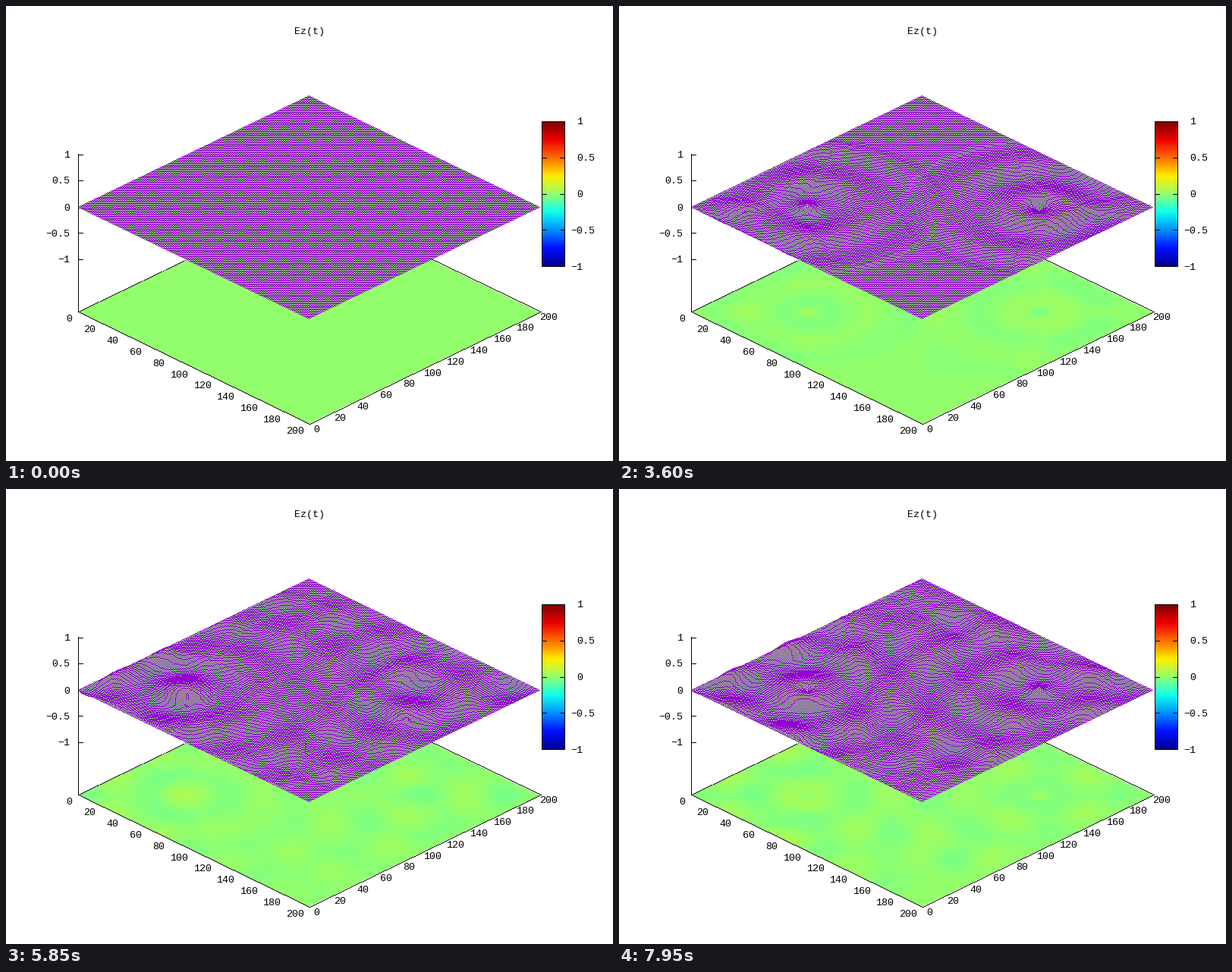
Recreate the animation shown at these times as a matplotlib script. Size 800 by 600 pixels, loop 8 s.

```python
import numpy as np
import matplotlib.pyplot as plt
from matplotlib.animation import FuncAnimation
from matplotlib.colors import LinearSegmentedColormap

W, H, DPI = 800, 600, 100
N = 200                       # grid points per side
SNAPSHOTS, STEPS = 54, 5      # pictures, and solver steps between them
TICK_MS, TICKS_PER_SNAPSHOT, LOOP_MS = 50, 3, 8000
OMEGA = 2 * np.pi / 60        # source frequency per solver step

X0, DX, DY = 95.2, 1.5265, 0.737     # isometric projection
SURFACE_Y, BASE_Y, Z_SCALE = 264.8, 403.4, 69
PURPLE, BLACK = (148, 0, 211, 255), (0, 0, 0, 255)
TICK_VALUES = (1, 0.5, 0, -0.5, -1)

JET = LinearSegmentedColormap.from_list(
    "jet_steps",
    ["#000090", "#000fff", "#0090ff", "#0fffee", "#90ff70",
     "#ffee00", "#ff7000", "#ee0000", "#7f0000"], N=128)


def simulate():
    """2D FDTD of Ez with two opposed sine sources; the border itself stays at zero."""
    ez = np.zeros((N, N))
    hx, hy = np.zeros((N, N - 1)), np.zeros((N - 1, N))
    courant = 1 / np.sqrt(2)
    fields = [ez.copy()]
    for n in range(1, (SNAPSHOTS - 1) * STEPS + 1):
        # H next to the low sides is never updated, so those walls reflect in phase
        hx[:, 1:] -= courant * np.diff(ez[:, 1:], axis=1)
        hy[1:] += courant * np.diff(ez[1:], axis=0)
        curl = np.diff(hy, axis=0)[:, 1:-1] - np.diff(hx, axis=1)[1:-1]
        ez[1:-1, 1:-1] += courant * curl
        ez[50, 50] += np.sin(OMEGA * n)
        ez[150, 150] -= np.sin(OMEGA * n)
        if n % STEPS == 0:
            fields.append(ez.copy())
    return fields


def to_pixel(v):
    return np.floor(np.asarray(v) + 0.5).astype(int)


def draw_lines(picture, x0, y0, x1, y1, color):
    """Draw one-pixel lines between arrays of integer end points."""
    x, y, x1, y1 = (np.ravel(v) for v in (x0, y0, x1, y1))
    dx, dy = x1 - x, y1 - y
    length = np.maximum(np.maximum(abs(dx), abs(dy)), 1)
    for t in range(length.max() + 1):
        live = length >= t
        part = t / length[live]
        step_x, step_y = (np.sign(d[live]) * to_pixel(abs(d[live]) * part)
                          for d in (dx, dy))
        picture[y[live] + step_y, x[live] + step_x] = color


def draw_path(picture, *points):
    xs, ys = np.array(points).T
    draw_lines(picture, xs[:-1], ys[:-1], xs[1:], ys[1:], BLACK)


grid_x, grid_y = np.meshgrid(np.arange(N), np.arange(N), indexing="ij")
node_x = X0 + DX * (grid_x + grid_y)
node_y = SURFACE_Y + DY * (grid_x - grid_y)
node_px = to_pixel(node_x)

# Pixels of the base map and the cell each one shows
rows, cols = np.mgrid[0:H, 0:W]
along, across = (cols - X0) / DX, (rows - BASE_Y) / DY
cell_x, cell_y = (along + across) / 2, (along - across) / 2
on_map = (cell_x >= 0) & (cell_x < N - 1) & (cell_y >= 0) & (cell_y < N - 1)
map_i, map_j = cell_x[on_map].astype(int), cell_y[on_map].astype(int)


def inside_cells(values, u, v):
    """Bilinear value at offset (u, v) of every cell."""
    low = values[:-1, :-1] * (1 - v) + values[:-1, 1:] * v
    high = values[1:, :-1] * (1 - v) + values[1:, 1:] * v
    return low * (1 - u) + high * u


def draw_surface(picture, field, colors):
    screen_y = node_y - Z_SCALE * field
    back_to_front = np.s_[:, ::-1]
    for u in np.arange(4) / 4:
        for v in np.arange(4) / 4:
            px = to_pixel(inside_cells(node_x, u, v))[back_to_front]
            py = to_pixel(inside_cells(screen_y, u, v))[back_to_front]
            picture[py, px] = colors[back_to_front]
    py = to_pixel(screen_y)
    draw_lines(picture, node_px[:-1], py[:-1], node_px[1:], py[1:], PURPLE)
    draw_lines(picture, node_px[:, :-1], py[:, :-1], node_px[:, 1:], py[:, 1:], PURPLE)


def draw_background():
    picture = np.full((H, W, 4), 255, np.uint8)
    draw_path(picture, (95, 403), (400, 256), (705, 403))
    picture[152:344, 706:737] = JET(np.linspace(1, 0, 192), bytes=True)[:, None]
    draw_path(picture, (706, 152), (736, 152), (736, 343), (706, 343), (706, 152))
    for value in TICK_VALUES:
        y = bar_row(value)
        draw_path(picture, (706, y), (712, y))
        draw_path(picture, (730, y), (736, y))
    return picture


def draw_front_axes(picture):
    draw_path(picture, (95, 403), (400, 551), (705, 403))
    draw_path(picture, (95, 195), (95, 403))
    for value in TICK_VALUES:
        y = axis_row(value)
        draw_path(picture, (95, y), (101, y))


def axis_row(value):
    return round(264.6 - Z_SCALE * value)


def bar_row(value):
    return round(247.6 - 95.5 * value)


def render(field):
    picture = background.copy()
    colors = JET((inside_cells(field, 0.5, 0.5) + 1) / 2, bytes=True)
    picture[on_map] = colors[map_i, map_j]
    draw_front_axes(picture)
    draw_surface(picture, field, colors)
    return picture


background = draw_background()
pictures = [render(field) for field in simulate()]

fig = plt.figure(figsize=(W / DPI, H / DPI), dpi=DPI, facecolor="white")
ax = fig.add_axes([0, 0, 1, 1])
ax.axis("off")
scene = ax.imshow(pictures[0], extent=(0, W, H, 0), interpolation="nearest",
                  aspect="auto")
ax.set_xlim(0, W)
ax.set_ylim(H, 0)


def label(x, y, text, ha):
    ax.text(x, y + 4.5, str(text).replace("-", "\u2212"), ha=ha, va="baseline",
            family="Liberation Mono", size=9.6)


label(400, 32, "Ez(t)", "center")
for value in TICK_VALUES:
    label(84, axis_row(value), value, "right")
    label(744 if value < 0 else 752, bar_row(value), value, "left")
for i in range(11):
    label(87.5 + 30.53 * i, 411 + 14.8 * i, 20 * i, "right")
    label(409 + 30.58 * i, 557 - 14.8 * i, 20 * i, "center")


def update(tick):
    scene.set_data(pictures[tick // TICKS_PER_SNAPSHOT])
    return [scene]


anim = FuncAnimation(fig, update, frames=LOOP_MS // TICK_MS, interval=TICK_MS,
                     repeat=True, repeat_delay=0, blit=False)
plt.show()
```
